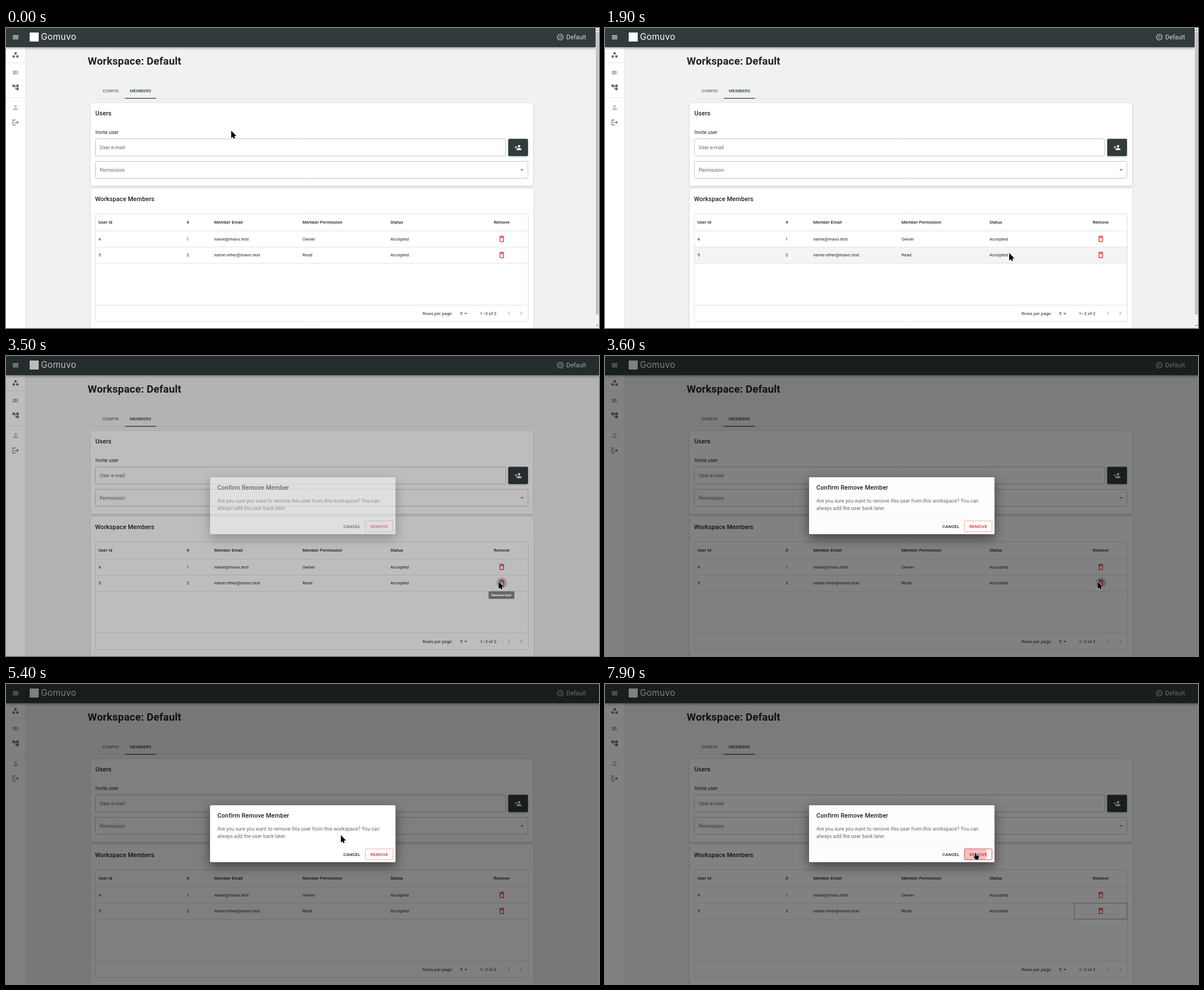
These frames come from a looping animation (1052x532 px, 8000 ms). An HTML page with a canvas:

```html
<!DOCTYPE html>
<html lang="en">
<head>
<meta charset="utf-8">
<title>Workspace members</title>
<style>
  html, body { margin: 0; width: 100%; height: 100%; overflow: hidden; background: #f0f2f2; }
  canvas { display: block; }
</style>
</head>
<body>
<canvas id="stage" width="1052" height="532"></canvas>
<script>
const W = 1052, H = 532, LOOP = 8000, STEP = 100;
const stage = document.getElementById('stage').getContext('2d');
const sheet = document.createElement('canvas');
sheet.width = W;
sheet.height = H;
const layer = sheet.getContext('2d');
let g = stage;

const DARK = '#313b3c', INK = '#212121', SOFT = '#666', RED = '#d32f2f', LINE = '#e0e0e0';
const BODY = 8.77, SMALL = 7.67, HEAD = 10.96;

// Icons on a 24 unit grid
const person = x => `M${x} 12c2.21 0 4-1.79 4-4s-1.79-4-4-4-4 1.79-4 4 1.79 4 4 4zm0 2c-2.67 0-8 1.34-8 4v2h16v-2c0-2.66-5.33-4-8-4z`;
const ICONS = {
  menu: 'M3 18h18v-2H3v2zm0-5h18v-2H3v2zm0-7v2h18V6H3z',
  list: 'M3 9h14V7H3v2zm0 4h14v-2H3v2zm0 4h14v-2H3v2zm16 0h2v-2h-2v2zm0-10v2h2V7h-2zm0 6h2v-2h-2v2z',
  tree: 'M22 11V3h-7v3H9V3H2v8h7V8h2v10h4v3h7v-8h-7v3h-2V8h2v3z',
  person: person(12),
  invite: person(15) + 'M6 10V7H4v3H1v2h3v3h2v-3h3v-2z',
  exit: 'M17 7l-1.41 1.41L18.17 11H8v2h10.17l-2.58 2.58L17 17l5-5zM4 5h8V3H4c-1.1 0-2 .9-2 2v14c0 1.1.9 2 2 2h8v-2H4z',
  drop: 'M7 10l5 5 5-5z',
  bin: 'M6 19c0 1.1.9 2 2 2h8c1.1 0 2-.9 2-2V7H6zM8 9h8v10H8zM15.5 4l-1-1h-5l-1 1H5v2h14V4z',
  prev: 'M15.41 16.59L10.83 12l4.58-4.59L14 6l-6 6 6 6z',
  next: 'M8.59 16.59L13.17 12 8.59 7.41 10 6l6 6-6 6z'
};
for (const name in ICONS) ICONS[name] = new Path2D(ICONS[name]);

const ROWS = [
  { top: 360, mid: 374, cells: ['4', '1', 'name@mavo.test', 'Owner', 'Accepted'] },
  { top: 389, mid: 402.5, cells: ['5', '2', 'name-other@mavo.test', 'Read', 'Accepted'] }
];
const HEADS = ['User Id', '#', 'Member Email', 'Member Permission', 'Status'];
const COLS = [164, 320.3, 369.5, 526, 682];

// Pointer path: time, x, y
const PATH = [
  [300, 399.5, 182], [700, 310, 270], [1200, 183, 392], [1300, 181, 396], [1500, 330, 410],
  [1700, 545, 413], [1900, 717, 399], [2100, 807, 397], [2300, 858, 398], [2500, 874, 400],
  [3700, 874, 400], [4100, 759, 383], [4400, 545, 296], [4700, 396, 253], [5000, 468, 268],
  [5400, 594, 268], [5600, 631, 276], [5900, 461, 293], [6000, 365, 288], [6200, 365, 288],
  [6300, 447, 283], [6400, 447, 283], [6500, 498, 282], [6700, 498, 282], [7400, 654, 297]
];

function pointerAt(t) {
  const i = PATH.findIndex(p => p[0] > t);
  if (i === 0) return PATH[0].slice(1);
  if (i < 0) return PATH[PATH.length - 1].slice(1);
  const [t0, x0, y0] = PATH[i - 1], [t1, x1, y1] = PATH[i];
  const k = (t - t0) / (t1 - t0);
  return [x0 + (x1 - x0) * k, y0 + (y1 - y0) * k];
}

// y is the middle of the capitals
function text(str, x, y, size, { weight = 400, color = INK, gap = 0.0107, align = 'left', family = 'Roboto' } = {}) {
  g.font = `${weight} ${size}px ${family}, sans-serif`;
  g.letterSpacing = gap * size + 'px';
  g.textAlign = align;
  g.fillStyle = color;
  g.fillText(str, x, y + size * 0.355);
}

function rect(x, y, w, h, color) {
  g.fillStyle = color;
  g.fillRect(x, y, w, h);
}

function box(x, y, w, h, { r = 2, fill, stroke, line = 1, shadow } = {}) {
  g.beginPath();
  g.roundRect(x, y, w, h, r);
  if (fill) {
    g.save();
    if (shadow) [g.shadowColor, g.shadowBlur, g.shadowOffsetY] = shadow;
    g.fillStyle = fill;
    g.fill();
    g.restore();
  }
  if (stroke) {
    g.strokeStyle = stroke;
    g.lineWidth = line;
    g.stroke();
  }
}

function disc(x, y, r, color) {
  g.beginPath();
  g.arc(x, y, r, 0, Math.PI * 2);
  g.fillStyle = color;
  g.fill();
}

function icon(name, x, y, color, scale = 0.548) {
  g.save();
  g.translate(x, y);
  g.scale(scale, scale);
  g.translate(-12, -12);
  g.fillStyle = color;
  g.fill(ICONS[name], 'evenodd');
  g.restore();
}

function sidebar() {
  rect(0, 34, 34.5, H, '#fff');
  rect(34.5, 34, 0.7, H, LINE);
  rect(0, 61, 34.5, 0.8, LINE);
  rect(0, 123, 34.5, 0.8, LINE);
  disc(17, 45, 2.2, SOFT);
  disc(13.7, 50.5, 2.2, SOFT);
  disc(20.3, 50.5, 2.2, SOFT);
  icon('list', 17, 79, SOFT);
  icon('tree', 17, 105.3, SOFT);
  icon('person', 17, 141, '#bdbdbd');
  icon('exit', 17, 167.5, SOFT);
}

function header(width) {
  box(0, 0, width, 34, { r: 0, fill: DARK, shadow: ['rgba(0,0,0,.35)', 4, 1.5] });
  icon('menu', 17, 16.4, '#fff');
  rect(42, 8, 16, 16, '#fff');
  text('Gomuvo', 62, 15.7, 15.4, { color: '#fff', gap: 0.02, family: 'Inter' });
  g.beginPath();
  g.arc(983.3, 16.3, 5, 0, Math.PI * 2);
  g.strokeStyle = '#e4e7e7';
  g.lineWidth = 1.1;
  g.stroke();
  for (const [dx, dy] of [[-1.8, 0], [1.8, 0], [0, -1.9], [0, 1.9]]) disc(983.3 + dx, 16.3 + dy, 0.8, '#e4e7e7');
  text('Default', 994, 16.3, HEAD, { color: '#d9dcdc', gap: 0 });
}

function scrollbar() {
  rect(1046, 0, 6, H, '#f1f1f1');
  rect(1046.5, 7, 5, 501, '#c1c1c1');
  g.fillStyle = '#555';
  for (const [y, d] of [[4.5, -2], [526.8, 2]]) {
    g.beginPath();
    g.moveTo(1046.8, y);
    g.lineTo(1051.2, y);
    g.lineTo(1049, y + d);
    g.fill();
  }
}

function usersCard() {
  const field = { stroke: '#c4c4c4' };
  box(150, 133, 785, 147, { fill: '#fff', shadow: ['rgba(0,0,0,.25)', 2.5, 0.8] });
  text('Users', 158.5, 150.7, HEAD, { weight: 500, gap: 0.0075 });
  text('Invite user', 158.7, 184.5, BODY, { gap: 0.0094 });
  box(158.5, 196.5, 728, 30.5, field);
  text('User e-mail', 166.2, 212, BODY, { color: SOFT, gap: 0.0094 });
  box(891, 196.5, 35, 30.5, { fill: DARK, shadow: ['rgba(0,0,0,.35)', 3, 1] });
  icon('invite', 908.5, 212, '#fff');
  box(158.5, 236.5, 767.5, 30, field);
  text('Permission', 166.2, 251.5, BODY, { color: SOFT, gap: 0.0094 });
  icon('drop', 915.5, 251.5, SOFT);
}

function membersCard(t, hotY) {
  const hover = t < 3500;
  box(150, 285, 786, 260, { fill: '#fff', shadow: ['rgba(0,0,0,.25)', 2.5, 0.8] });
  text('Workspace Members', 158, 302.7, HEAD, { weight: 500, gap: 0.0075 });
  ROWS.forEach(row => {
    if (hover && hotY >= row.top && hotY < row.top + 28.5) rect(159, row.top, 767, 28.3, '#f4f4f4');
  });
  box(158.5, 329.5, 768, 191, { stroke: LINE });
  for (const y of [359.5, 388.1, 416.7, 491]) rect(159, y, 767, 0.9, LINE);

  HEADS.forEach((name, i) => text(name, COLS[i], 344.3, SMALL, { weight: 500 }));
  text('Remove', 879.3, 344.3, SMALL, { weight: 500, align: 'center' });
  if (t >= 2500 && t < 3800) disc(879.3, 402.6, t < 3500 ? 10 : 9.3, t < 3500 ? '#e3e3e3' : '#c9c9c9');
  ROWS.forEach(row => {
    row.cells.forEach((cell, i) => text(cell, COLS[i], row.mid, SMALL));
    icon('bin', 879.5, row.mid, '#dc2626', 0.62);
  });
  if (t >= 3300 && t < 3500 || t >= 7900) box(832.5, 388.6, 93.5, 28.2, { r: 0, stroke: '#8c8c8c', line: 0.8 });

  text('Rows per page:', 739, 506, SMALL);
  text('5', 805.5, 506, SMALL);
  icon('drop', 815.7, 506.3, SOFT);
  text('1–2 of 2', 840.7, 506, SMALL);
  icon('prev', 892.3, 506, '#b0b0b0');
  icon('next', 914, 506, '#b0b0b0');
}

function dialog(t) {
  box(362, 215, 329, 101, { fill: '#fff', shadow: ['rgba(0,0,0,.5)', 20, 7] });
  text('Confirm Remove Member', 375, 233, HEAD, { weight: 500, gap: 0.0075 });
  const copy = { color: SOFT, gap: 0.0094 };
  text('Are you sure you want to remove this user from this workspace? You can', 375, 257, BODY, copy);
  text('always add the user back later.', 375, 270.1, BODY, copy);
  const label = { weight: 500, gap: 0.0286, align: 'center' };
  text('CANCEL', 613.6, 302, SMALL, label);
  const over = t >= 7300;
  box(637.5, 292.3, 49, 19.4, {
    fill: over ? 'rgba(211,47,47,.06)' : '#fff',
    stroke: over ? RED : 'rgba(211,47,47,.5)', line: 0.8
  });
  if (t >= 7800) {
    g.save();
    g.clip();
    disc(657, 302, t < 7900 ? 9 : 20.5, 'rgba(211,47,47,.24)');
    g.restore();
  }
  text('REMOVE', 662.2, 302, SMALL, { ...label, color: RED });
}

function overlay(t) {
  if (t < 3500) return;
  const k = t < 3600 ? 0.52 : t < 3700 || t >= 7900 ? 0.985 : 1;
  rect(0, 0, W, H, `rgba(0,0,0,${0.5 * k})`);
  g = layer;
  g.clearRect(0, 0, W, H);
  dialog(t);
  g = stage;
  g.globalAlpha = k;
  g.drawImage(sheet, 0, 0);
  g.globalAlpha = 1;
}

function tooltip(t) {
  if (t < 2500 || t >= 3700) return;
  g.globalAlpha = t < 2700 ? 0.6 : t < 3600 ? 1 : 0.04;
  box(856, 417.3, 46, 13.4, { fill: 'rgba(97,97,97,.94)' });
  text('Remove User', 879.1, 423.8, 6.03, { weight: 500, color: '#fff', gap: 0, align: 'center' });
  g.globalAlpha = 1;
}

const ARROW = new Path2D('M0 0V13.3L3 10.8 4.4 14.2 6.7 13.2 5.3 9.8 9.2 9.4z');
const HAND = new Path2D('M2.3 3.6Q3.4 2.4 4.5 3.6V7L8.4 7.8Q9.4 8.1 9.3 9.2L8.7 12.6 8 14.6H3.2L2.6 13 0 10Q-.2 8.6 1.2 8.9L2.3 9.6z');

function pointer(t, x, y) {
  const shape = t >= 2700 && t < 3500 || t >= 7300 ? HAND : ARROW;
  g.save();
  g.translate(x, y);
  g.lineJoin = 'round';
  g.lineWidth = 1.2;
  g.strokeStyle = 'rgba(255,255,255,.85)';
  g.stroke(shape);
  g.fillStyle = '#000';
  g.fill(shape);
  g.restore();
}

function draw(t) {
  const [x, y] = pointerAt(t);
  const locked = t >= 3500;
  rect(0, 0, W, H, '#f0f2f2');
  sidebar();
  text('Workspace: Default', 145, 58.3, 18.64, { weight: 700, gap: 0.0074 });
  text('CONFIG', 171.5, 111, SMALL, { weight: 500, color: SOFT, gap: 0.0286 });
  text('MEMBERS', 219.7, 111, SMALL, { weight: 500, color: DARK, gap: 0.0286 });
  rect(163, 124.6, 757, 0.8, '#d6d8d8');
  rect(211, 124, 55, 1.2, DARK);
  usersCard();
  membersCard(t, y);
  header(locked ? W : 1046);
  if (!locked) scrollbar();
  overlay(t);
  tooltip(t);
  pointer(t, x, y);
}

function tick() {
  const t = performance.now() % LOOP;
  draw(Math.floor(t / STEP) * STEP);
  requestAnimationFrame(tick);
}
tick();
</script>
</body>
</html>
```
